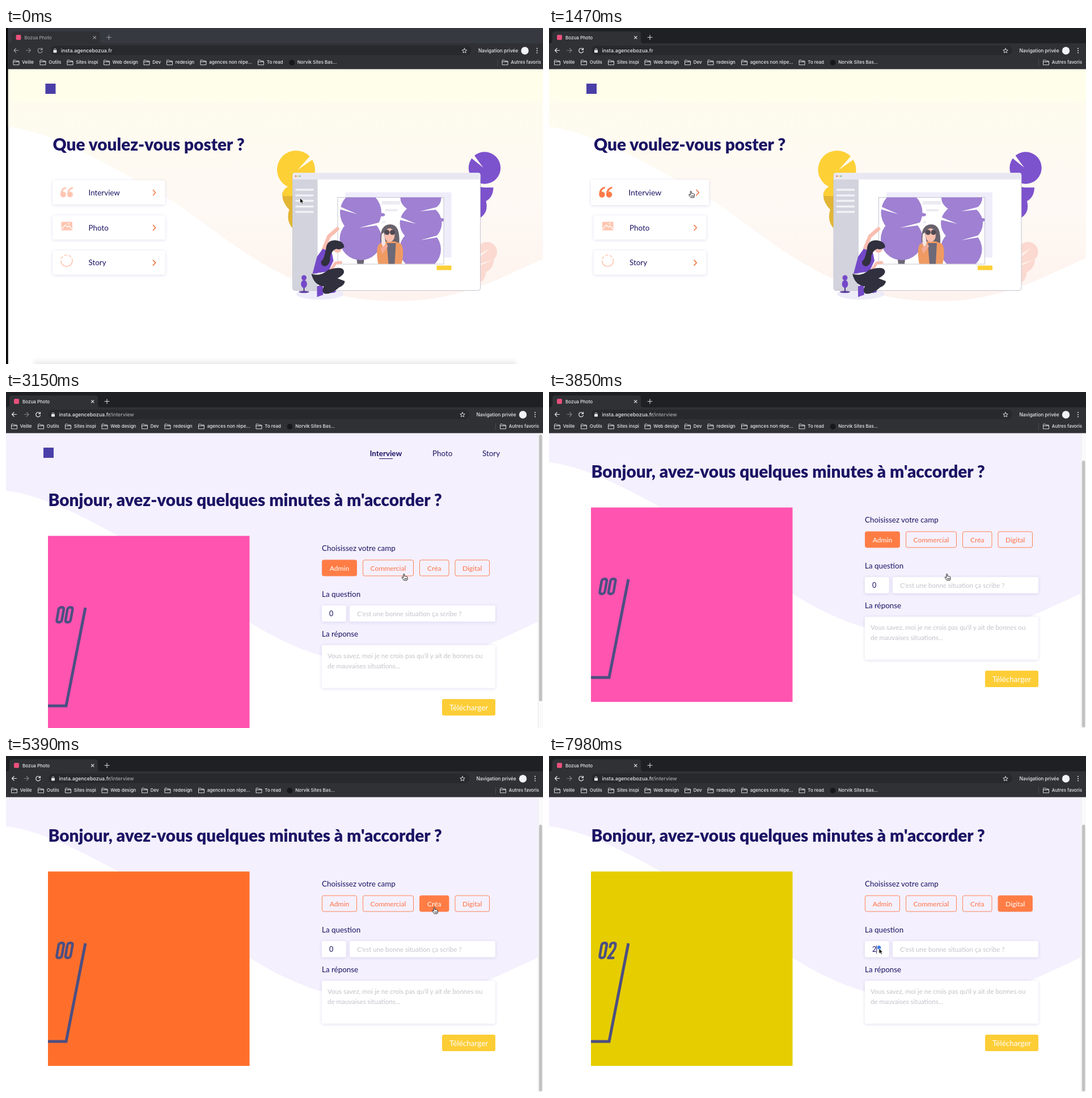
Animation, 947 px wide and 592 px high, one loop 8 s. Source, as an HTML page:

```html
<!DOCTYPE html>
<html lang="fr">
<head>
<meta charset="utf-8">
<title>Générateur de posts</title>
<style>
html, body { margin: 0; width: 100%; height: 100%; overflow: hidden; background: #000; }
svg { display: block; width: 947px; height: 592px; }
text { font-family: Lato, sans-serif; font-size: 13.4px; fill: #1b1464; }
.chrome text { font: 500 8px Inter, sans-serif; fill: #e8eaed; }
text.title { font-size: 29.75px; font-weight: 900; }
text.hint { font-size: 11.55px; fill: #c3c3cb; }
.camp text { font-size: 12.1px; text-anchor: middle; }
.field { fill: #fff; filter: url(#soft); }
.line { fill: none; stroke-linecap: round; stroke-linejoin: round; }
</style>
</head>
<body>
<svg viewBox="0 0 947 592">
<defs>
  <linearGradient id="warm" x1="0" y1="73" x2="0" y2="482" gradientUnits="userSpaceOnUse">
    <stop offset="0" stop-color="#fffeea"/><stop offset=".13" stop-color="#fffeec"/>
    <stop offset=".15" stop-color="#fefbee"/><stop offset=".6" stop-color="#fef9f4"/>
    <stop offset="1" stop-color="#fdf2ee"/>
  </linearGradient>
  <linearGradient id="dock" x1="0" y1="0" x2="0" y2="1">
    <stop offset="0" stop-color="#fff"/><stop offset="1" stop-color="#dcdcdc"/>
  </linearGradient>
  <filter id="soft" x="-20%" y="-30%" width="140%" height="170%">
    <feDropShadow dx="0" dy="1" stdDeviation="2.5" flood-color="#4b3fa5" flood-opacity=".18"/>
  </filter>
  <filter id="blur"><feGaussianBlur stdDeviation="3"/></filter>
  <clipPath id="photoClip"><rect x="581.5" y="298.5" width="187" height="117"/></clipPath>
  <clipPath id="squareClip"><rect x="74" y="253.5" width="355.5" height="342.5"/></clipPath>
  <path id="wave" d="M0 73V174C80 182 185 245 290 305C395 375 500 481 680 481C790 483 860 445 947 405V73Z"/>
  <g id="brand"><rect x="66" y="98" width="18" height="18" fill="#4a3fa8"/></g>
  <path id="folder" class="line" d="M.5 8.5V1.5Q.5 .5 1.5 .5H4L5.3 2H9.5Q10.5 2 10.5 3V8.5Z M.5 3.6H10.5" stroke="#dadce0"/>
</defs>

<g id="screen">
  <rect width="951" height="592" fill="#fff"/>

  <g id="home">
    <use href="#wave" fill="url(#warm)"/>
    <use href="#brand"/>
    <text class="title" x="79" y="216">Que voulez-vous poster ?</text>
    <g id="cards"></g>

    <g id="illustration">
      <g fill="#fdd036">
        <path fill="#e2b534" d="M484 290H530V352H501Q490 338 496 320Q482 306 484 290Z"/>
        <path d="M484 292Q488 275 510 280V296H485Z"/>
        <circle cx="508" cy="249.5" r="33.5"/>
        <path fill="#fffaf0" d="M511 250L533 225L538 231Z"/>
      </g>
      <g fill="#7d52cd">
        <path d="M824 280H856Q856 298 843 305Q848 325 832 335Z"/>
        <circle cx="840.5" cy="246.5" r="28.2"/>
        <path fill="#fffaf2" d="M838 246L817 229L822 224ZM833 281L857 277L856 281Z"/>
      </g>
      <g fill="#fbd9d0">
        <circle cx="845" cy="394.5" r="17.5"/>
        <path d="M832 408H857Q856 424 843 430Q841 445 832 449Z"/>
        <path fill="#fdf4ef" d="M833 398L850 388L834 402ZM834 415L856 408L834 418Z"/>
      </g>
      <ellipse cx="550" cy="468.5" rx="42" ry="10" fill="#eeebf9"/>
      <rect x="502" y="255.5" width="331" height="207" rx="4" fill="#fff" stroke="#c4c4cf"/>
      <path d="M502 267V259Q502 255 506 255H829Q833 255 833 259V267Z" fill="#e9e8f2"/>
      <path d="M502 267H546V462H506Q502 462 502 458Z" fill="#d2d3dc"/>
      <path d="M507 285H539M507 295H539M507 304.5H539M507 314.5H539M507 324H539" stroke="#f1f1f7" stroke-width="3.4"/>
      <circle cx="507.5" cy="261" r="1.3" fill="#e9604c"/><circle cx="511.2" cy="261" r="1.3" fill="#f3c94b"/><circle cx="515" cy="261" r="1.3" fill="#5fb878"/>
      <rect x="595" y="289.5" width="187" height="115" fill="#efedfa"/>
      <rect x="581.5" y="298.5" width="187" height="117.5" fill="#fff" stroke="#c5c5d0"/>
      <g clip-path="url(#photoClip)">
        <path d="M659 305H691V311H659ZM665 319H687V323H665ZM657 344L665 339V344Z" fill="#ecebf3"/>
        <path d="M614 400H629L627 416H616Z" fill="#6b6675"/>
        <g fill="#9f80d2">
          <ellipse cx="622" cy="325" rx="36.5" ry="38"/><ellipse cx="622" cy="372" rx="37" ry="37"/>
          <ellipse cx="728" cy="300" rx="36" ry="25"/><ellipse cx="728" cy="344" rx="37" ry="34"/><ellipse cx="727" cy="390" rx="36.5" ry="36"/>
          <ellipse cx="660" cy="329" rx="5" ry="3"/><ellipse cx="765" cy="338" rx="4" ry="3"/>
        </g>
        <path d="M584 314L616 328L584 319ZM619 352L657 342L657 347ZM762 314L727 323L764 319ZM691 333L720 345L691 338ZM727 374L762 364L762 368Z" fill="#fff"/>
        <path d="M657 377Q655 346 674 346Q692 346 690 380Q674 386 657 377Z" fill="#68626c"/>
        <path d="M653 416Q648 390 654 381L667 376H682L693 380Q700 392 694 416Z" fill="#ef9a63"/>
        <path d="M668 379H684L682 416H671Z" fill="#6c6978"/>
        <ellipse cx="673" cy="365" rx="9" ry="12" fill="#f9bfae"/>
        <path d="M659 363L663 360L666 379L662 388Q657 379 659 363Z" fill="#f6e7e5"/>
        <circle cx="668.5" cy="360" r="4.5" fill="#514954"/><circle cx="678" cy="360" r="4.5" fill="#514954"/>
        <path d="M657 388L668 380L670 385L660 398Z" fill="#f4ab98"/>
      </g>
      <rect x="756" y="418.5" width="26" height="8" fill="#fdd036"/>
      <path d="M557 389L566 367L581 354" class="line" stroke="#f9bdb0" stroke-width="6.5"/>
      <path d="M569 427L578 414L587 413" class="line" stroke="#f9bdb0" stroke-width="5"/>
      <path d="M545 455L555 452L556 470L545 474ZM563 462L578 463Q580 467 565 467Z" fill="#7449c9"/>
      <path d="M545 403L555 389L571 395L574 410L565 429L537 433Z" fill="#7449c9"/>
      <ellipse cx="581" cy="386" rx="8" ry="10" fill="#f9bdb0"/>
      <path d="M561 387Q563 374 577 374Q592 375 593 386Q585 392 579 389Q570 392 568 404Q569 414 562 419Q552 422 552 411Q558 408 561 387Z" fill="#30303e"/>
      <path d="M535 433Q550 439 565 426Q589 419 592 427Q595 434 581 441L594 446Q594 453 584 457Q570 470 558 468Q552 464 557 455Q540 454 535 433Z" fill="#30303e"/>
      <path d="M522 438V465" stroke="#4c397e" stroke-width="2"/>
      <circle cx="522" cy="440" r="4.5" fill="#7449c9"/><ellipse cx="522" cy="451" rx="5.3" ry="7" fill="#7449c9"/>
      <ellipse cx="522" cy="465" rx="9" ry="1.7" fill="#573a9a"/>
    </g>
    <rect id="dockShadow" x="45" y="582" width="852" height="18" rx="9" fill="url(#dock)" filter="url(#blur)"/>
  </g>

  <g id="interview">
    <g id="scroller">
      <use href="#wave" fill="#f4f0fd" transform="scale(.99 1)"/>
      <use href="#brand"/>
      <text x="641.5" y="112.5" style="font-weight:700">Interview</text>
      <text x="752" y="112.5">Photo</text>
      <text x="840" y="112.5">Story</text>
      <path d="M658 117.5H682" stroke="#1b1464"/>
      <text class="title" x="74.5" y="201">Bonjour, avez-vous quelques minutes à m'accorder ?</text>
      <rect id="square" x="74" y="253.5" width="355.5" height="342.5"/>
      <g class="line" stroke="#4c4f82" clip-path="url(#squareClip)">
        <path d="M74 553H106L140 380" stroke-width="5" style="stroke-linecap:butt;stroke-linejoin:miter"/>
        <g stroke-width="4.5">
          <path id="tens" transform="translate(93.5 379.3) skewX(-10)"/>
          <path id="units" transform="translate(109 379.3) skewX(-10)"/>
        </g>
      </g>
      <text x="557" y="279.5">Choisissez votre camp</text>
      <g id="camps"></g>
      <text x="557" y="360.5">La question</text>
      <rect class="field" x="557" y="376" width="42.5" height="28.5" rx="3"/>
      <text id="number" x="570" y="395" style="font-size:12.5px">0</text>
      <g id="spinner">
        <rect x="579" y="383.5" width="6" height="13" rx="3" fill="#e3e4e8"/>
        <circle id="stepUp" cx="582" cy="387.5" r="3.2" fill="#3d7ff0"/>
      </g>
      <path id="caret" d="M577.5 384V398" stroke="#1b1464" stroke-width=".9"/>
      <rect class="field" x="606" y="376" width="257" height="28.5" rx="3"/>
      <text class="hint" x="619" y="394.7">C'est une bonne situation ça scribe ?</text>
      <text x="557" y="430.5">La réponse</text>
      <rect class="field" x="557" y="446" width="306" height="75.5" rx="3"/>
      <text class="hint" x="567" y="469">Vous savez, moi je ne crois pas qu'il y ait de bonnes ou</text>
      <text class="hint" x="567" y="487">de mauvaises situations...</text>
      <rect x="769" y="541" width="94" height="29" rx="3" fill="#fdcd36"/>
      <text x="782" y="560.5" style="font-size:13.5px;fill:#fff">Télécharger</text>
    </g>
    <path d="M938 73H947V592H938Z" fill="#fafafa"/><path d="M938.5 73V592" stroke="#e8e8e8"/>
    <rect id="thumb" x="940" y="75" width="5.5" height="470" rx="2.7" fill="#c1c1c1"/>
  </g>

  <g class="chrome">
    <rect width="951" height="72.5" fill="#2f3135"/>
    <rect id="tabStrip" width="951" height="27"/>
    <path d="M1 27Q6 27 6 22V11Q6 6 11 6H157Q162 6 162 11V22Q162 27 167 27Z" fill="#2f3135"/>
    <rect x="14" y="12" width="9" height="9" rx="2" fill="#e8507c"/>
    <rect x="75" y="31" width="742" height="17" rx="8.5" fill="#27292c"/>
    <g class="dimmable">
      <text x="29" y="19.5">Bozua Photo</text>
      <path class="line" d="M150.5 14.5L155 19M155 14.5L150.5 19M174 16.5H182M178 12.5V20.5" stroke="#d5d7da" stroke-width="1.1"/>
    </g>
    <g class="line" stroke="#e8eaed" stroke-width="1.2">
      <path class="dimmable" d="M18.5 39.5H10.5M14 36L10.5 39.5L14 43"/>
      <path d="M32 39.5H40M36.5 36L40 39.5L36.5 43" stroke="#7c7f84"/>
      <path class="dimmable" d="M60 37.5A4 4 0 1 0 60.5 41M60.5 35.5V38.3H57.5"/>
      <path d="M805 35.8L806.2 38.6L809.2 38.9L806.9 40.8L807.6 43.8L805 42.2L802.4 43.8L803.1 40.8L800.8 38.9L803.8 38.6Z" stroke-width=".9"/>
    </g>
    <rect x="80" y="39" width="6" height="4.5" rx=".7" fill="#e8eaed"/>
    <path class="line" d="M81.3 39V37.5Q83 35.2 84.7 37.5V39" stroke="#e8eaed"/>
    <text x="93.5" y="42.8" style="font-size:8.9px">insta.agencebozua.fr<tspan id="path" fill="#a3a7ad">/interview</tspan></text>
    <text x="829.5" y="42.7" style="font-size:8.4px">Navigation privée</text>
    <circle cx="911.5" cy="40" r="6.7" fill="#f1f3f4"/>
    <path d="M933 36V44.5" stroke="#e8eaed" stroke-width="2" stroke-linecap="round" stroke-dasharray="0 3.7"/>
    <g id="bookmarks"></g>
    <circle cx="500.5" cy="61" r="5" fill="#17181b"/>
    <path d="M863.5 55V67" stroke="#4a4c50"/>
  </g>
</g>
<rect id="edge" height="592" fill="#08080a"/>

<g id="cursor" stroke-linejoin="round">
  <path id="arrow" d="M0 0V9.3L2.2 7.3L3.7 10.6L5.4 9.9L3.9 6.7H6.7Z" fill="#000" stroke="#fff" stroke-width=".8"/>
  <path id="hand" d="M-1.2 5.5V-1Q-.3 -2.5 .7 -1V2.6Q2 1.6 2.6 2.9Q4 2.2 4.5 3.5Q6 3 6 5V7.5Q5.8 9 5 9.8H-.3Q-1.5 8 -3.6 5.6Q-4.3 3.6 -2.5 4.1ZM.9 6V8.2M2.6 6V8.2M4.2 6V8.2" fill="#fff" stroke="#111" stroke-width=".9"/>
</g>
</svg>

<script>
const LOOP = 8000;
const OPEN = 1960;
const $ = id => document.getElementById(id);
const set = (el, attrs) => { for (const name in attrs) el.setAttribute(name, attrs[name]); };
const show = (id, on) => { $(id).style.display = on ? "" : "none"; };
const clamp = v => Math.min(1, Math.max(0, v));
const ease = v => (v = clamp(v), v * v * (3 - 2 * v));
const ramp = (t, start, length) => ease((t - start) / length);
const mix = (a, b, p) => a + (b - a) * p;
const rgb = (a, b, p) => `rgb(${a.map((v, i) => mix(v, b[i], p))})`;

const bookmarks = [[9, "Veille"], [56, "Outils"], [104, "Sites inspi"], [168.5, "Web design"], [239, "Dev"],
  [279.5, "redesign"], [339, "agences non répe..."], [440.5, "To read"], [494.5, "Norvik Sites Bas..."], [871, "Autres favoris"]];
$("bookmarks").innerHTML = bookmarks.map(([x, label]) =>
  (label.startsWith("Norvik") ? "" : `<use href="#folder" x="${x}" y="56"/>`) +
  `<text x="${x + 15.8}" y="63.3">${label}</text>`).join("");

const quote = x => `<path d="M${x + 10} 280Q${x} 282 ${x} 293A5 5 0 1 0 ${x + 4} 288.5Q${x + 5} 284 ${x + 10} 283Z"/>`;
const icons = [
  `<g fill="#ff7a48">${quote(92.5)}${quote(104.5)}</g>`,
  `<path d="M94 341.5H113.5V356.5H94Z" fill="#ff7a48"/><path class="line" d="M95 354L101 347L105 351L108 348.5L112.5 354" stroke="#fff" stroke-width="1.3"/><circle cx="107" cy="345" r="1.3" fill="#fff"/>`,
  `<circle cx="103.5" cy="410" r="10" fill="none" stroke="#ff7a48" stroke-width="1.6" stroke-dasharray="31.4 3 5 3 5 3 5 3 4.4 0"/>`
];
$("cards").innerHTML = ["Interview", "Photo", "Story"].map((label, i) => {
  const y = 268.5 + i * 61.8;
  return `<g class="card"><rect class="field" x="79" y="${y}" width="198" height="42.5" rx="3"/>
    <g class="icon" opacity=".42">${icons[i]}</g>
    <text x="142" y="${y + 26.3}">${label}</text>
    <path class="line" d="M256 ${y + 17}L260.2 ${y + 21.5}L256 ${y + 26}" stroke="#f4743f" stroke-width="1.6"/></g>`;
}).join("");

const camps = [
  { label: "Admin", x: 557, width: 62, color: "#ff54b0", on: -1000 },
  { label: "Commercial", x: 629, width: 90, color: "#1fc9bd", on: 4500 },
  { label: "Créa", x: 729, width: 52.5, color: "#ff6f2b", on: 5120 },
  { label: "Digital", x: 791.5, width: 61.5, color: "#e6cd00", on: 6280 }
];
$("camps").innerHTML = camps.map(({ label, x, width }) =>
  `<g class="camp"><rect x="${x + .5}" y="296" width="${width - 1}" height="28" rx="3" fill="#ff7d45" stroke="#ff8257"/>
   <text x="${x + width / 2}" y="314.5">${label}</text></g>`).join("");
const campNodes = document.querySelectorAll(".camp");

const digits = [
  "M0 4.5Q0 0 4.5 0Q9 0 9 4.5V22Q9 26.5 4.5 26.5Q0 26.5 0 22Z",
  "M2 4L6 0V26.5",
  "M0 7V4.5Q0 0 4.5 0Q9 0 9 4.5V8Q9 11 6.5 15L0 26.5H9"
];

// Pointer stops: time, x, y
const stops = [[0, 518.5, 299.5], [500, 518.5, 299.5], [1250, 250.5, 289], [2100, 250.5, 289],
  [3000, 702, 322], [4050, 702, 322], [4400, 684, 268], [4650, 684, 268], [5020, 755.5, 268], [5900, 755.5, 268],
  [6180, 806.5, 268], [6600, 806.5, 268], [7200, 582, 339], [LOOP, 582, 339]];

function pointer(t) {
  const i = stops.findIndex(stop => stop[0] > t);
  const [t0, x0, y0] = stops[i - 1], [t1, x1, y1] = stops[i];
  const p = ramp(t, t0, t1 - t0);
  return [mix(x0, x1, p), mix(y0, y1, p)];
}

function draw(t) {
  const slide = t < 850 ? 3.5 * Math.exp(-t / 230) : 0;
  set($("screen"), { transform: `translate(${slide} 0)` });
  set($("edge"), { width: slide });
  set($("dockShadow"), { opacity: 1 - ramp(t, 0, 450) });

  const active = ramp(t, 400, 100);
  set($("tabStrip"), { fill: rgb([54, 57, 63], [31, 32, 35], active) });
  document.querySelectorAll(".dimmable").forEach(el => set(el, { opacity: mix(.6, 1, active) }));

  const opened = t >= OPEN;
  show("home", !opened);
  show("interview", opened);
  show("path", opened);

  const hover = ramp(t, 950, 220);
  const card = document.querySelector(".card");
  set(card, { transform: `translate(178 289.7) scale(${1 + .05 * hover}) translate(-178 -289.7)` });
  set(card.querySelector(".icon"), { opacity: mix(.42, 1, hover) });

  const scroll = 50 * ramp(t, 3430, 340);
  set($("scroller"), { transform: `translate(0 ${-scroll})` });
  set($("thumb"), { y: 75 + scroll * .92 });

  camps.forEach((camp, i) => {
    const next = camps[i + 1];
    const level = ramp(t, camp.on, 250) - (next ? ramp(t, next.on, 250) : 0);
    const [box, label] = campNodes[i].children;
    set(box, { "fill-opacity": level });
    label.style.fill = rgb([255, 112, 67], [255, 255, 255], level);
    if (t >= camp.on) set($("square"), { fill: camp.color });
  });

  const count = (t >= 7420) + (t >= 7820);
  $("number").textContent = count;
  set($("tens"), { d: digits[0] });
  set($("units"), { d: digits[count] });
  show("spinner", t >= 7130);
  show("stepUp", (t >= 7400 && t < 7540) || t >= 7800);
  show("caret", t >= 7420);

  const [x, y] = pointer(t);
  const hand = (t > 950 && t < 2120) || (t > 2880 && t < 6680);
  set($("cursor"), { transform: `translate(${x} ${y})` });
  show("hand", hand);
  show("arrow", !hand);
}

function tick(now) {
  draw(now % LOOP);
  requestAnimationFrame(tick);
}
draw(0);
requestAnimationFrame(tick);
</script>
</body>
</html>
```
